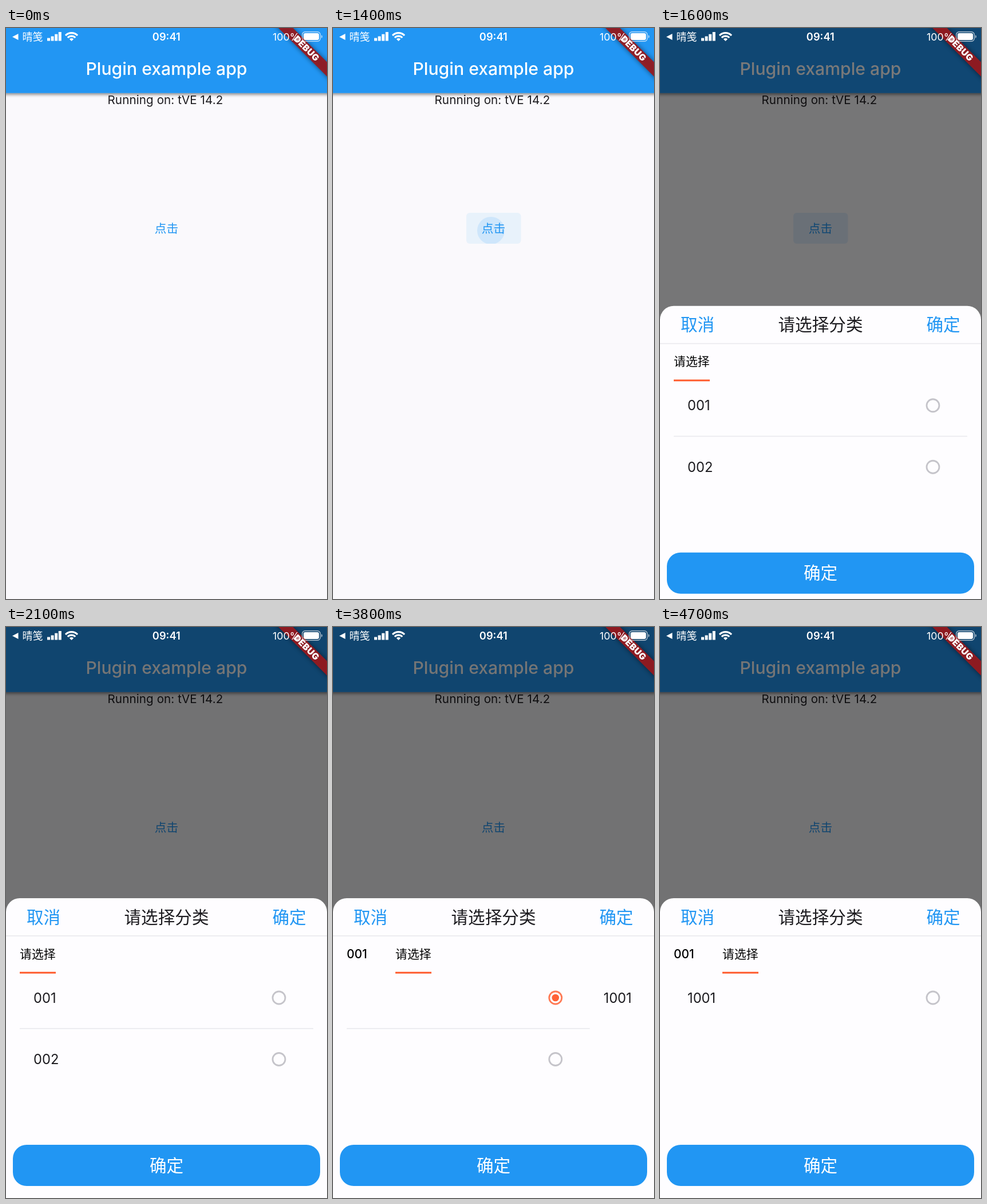
These frames come from a looping animation (561 by 998 pixels, 5000 ms). An HTML page:

```html
<!DOCTYPE html>
<html lang="zh-CN">
<head>
<meta charset="utf-8">
<style>
  html, body { margin: 0; width: 100%; height: 100%; overflow: hidden; background: #faf9fc; }
  svg { display: block; width: 561px; height: 998px; }
  text { font-family: Inter, "Noto Sans CJK SC", "Noto Sans CJK", sans-serif; fill: #1d1c20; }
  .mid { text-anchor: middle; }
  .blue { fill: #2196f3; }
  .white { fill: #fff; }
  .head { font-size: 29.6px; }
  .tab { font-size: 20.9px; fill: #000; }
  .row { font-size: 23.7px; }
  .line { fill: #e9e9ed; }
  .ring { fill: none; stroke: #c5c4ca; stroke-width: 2.8; }
</style>
</head>
<body>
<svg viewBox="0 0 561 998">
  <defs>
    <filter id="barShadow" x="-10%" y="-10%" width="120%" height="130%">
      <feDropShadow dx="0" dy="3" stdDeviation="2.6" flood-opacity=".42"/>
    </filter>
    <filter id="blur" x="-30%" y="-60%" width="160%" height="220%"><feGaussianBlur stdDeviation="4.5"/></filter>
    <clipPath id="buttonClip"><rect x="233" y="323" width="95.5" height="54" rx="6"/></clipPath>
    <clipPath id="pageClip"><rect x="24" y="607" width="513" height="290"/></clipPath>
  </defs>

  <rect width="561" height="998" fill="#faf9fc"/>
  <rect x="-20" y="-20" width="601" height="133.7" class="blue" filter="url(#barShadow)"/>
  <text class="mid white" x="280.5" y="82.2" font-size="30.2" font-weight="500">Plugin example app</text>
  <text x="177.5" y="133" font-size="20.6" letter-spacing=".1">Running on: tVE 14.2</text>
  <g clip-path="url(#buttonClip)" class="blue">
    <rect id="highlight" x="233" y="323" width="96" height="54"/>
    <circle id="ripple" cx="276" cy="354"/>
  </g>
  <text class="mid blue" x="280.5" y="358" font-size="20.7">点击</text>

  <rect id="dim" width="561" height="998"/>

  <g id="sheet">
    <path d="M0 1000V498a24 24 0 0 1 24-24H537a24 24 0 0 1 24 24V1000Z" fill="#fefdff"/>
    <text class="head blue" x="36" y="517.5">取消</text>
    <text class="head mid" x="280.5" y="517.5">请选择分类</text>
    <text class="head blue" x="465.5" y="517.5">确定</text>
    <rect class="line" y="539" width="561" height="1.6"/>
    <text id="picked" class="tab" x="24" y="578.5" font-weight="500">001</text>
    <g id="prompt">
      <text class="tab" x="24" y="578.7">请选择</text>
      <rect x="24" y="602.7" width="63" height="3" fill="#ff5a2b"/>
    </g>
    <g clip-path="url(#pageClip)">
      <g id="pages">
        <text class="row" x="48" y="656.5">001</text>
        <circle id="radio" class="ring" cx="477" cy="648" r="11"/>
        <circle id="dot" cx="477" cy="648" fill="#ff6236"/>
        <rect class="line" x="24" y="701" width="513" height="1.6"/>
        <text class="row" x="48" y="764">002</text>
        <circle class="ring" cx="477" cy="755.5" r="11"/>
        <text class="row" x="561" y="656.5">1001</text>
        <circle class="ring" cx="990" cy="648" r="11"/>
      </g>
    </g>
    <rect class="blue" x="12" y="905" width="537" height="72" rx="24"/>
    <text class="head mid white" x="280.5" y="951.5">确定</text>
  </g>

  <g transform="translate(561 0) rotate(45)">
    <rect x="-80" y="42" width="160" height="18" opacity=".5" filter="url(#blur)"/>
    <rect x="-80" y="42" width="160" height="18" fill="#981a1f" opacity=".92"/>
    <text class="mid white" y="56" font-size="15.6" font-weight="900" letter-spacing=".3">DEBUG</text>
  </g>

  <g class="white">
    <path d="M11 15.5L21.5 10V21Z"/>
    <text class="white" x="28.5" y="22" font-size="18">晴笺</text>
    <path d="M72 17.5h5v5h-5zM78.6 14.5h5v8h-5zM85.2 10.8h5v11.7h-5zM91.8 7h5v15.5h-5z"/>
    <g fill="none" stroke="#fff" stroke-width="3.2">
      <path d="M104 13.2a14.5 14.5 0 0 1 21 0M107.8 17a9.3 9.3 0 0 1 13.4 0"/>
    </g>
    <path d="M114.5 23L110.8 19.2a5.3 5.3 0 0 1 7.4 0Z"/>
    <text class="mid white" x="280.3" y="22" font-size="18.3" font-weight="600">09:41</text>
    <text class="white" x="466" y="22" font-size="17.8">100%</text>
    <rect x="517.7" y="6.7" width="31.6" height="16.6" rx="5" fill="none" stroke="#fff" stroke-width="1.4" opacity=".65"/>
    <rect x="520" y="9" width="27" height="12" rx="3"/>
    <path d="M551 12.3a3 3 0 0 1 0 5.6Z" opacity=".65"/>
  </g>
</svg>
<script>
const LOOP = 5000, STEP = 100;
const el = id => document.getElementById(id);
const set = (id, attrs) => {
  for (const name in attrs) el(id).setAttribute(name, attrs[name]);
};
const ramp = (t, start, length) => Math.min(1, Math.max(0, (t - start) / length));

function bezier(x1, y1, x2, y2) {
  const at = (a, b, s) => 3 * a * s * (1 - s) ** 2 + 3 * b * s * s * (1 - s) + s ** 3;
  return x => {
    let low = 0, high = 1;
    for (let i = 0; i < 24; i++) {
      const s = (low + high) / 2;
      if (at(x1, x2, s) < x) low = s; else high = s;
    }
    return at(y1, y2, high);
  };
}
const ease = bezier(.25, .1, .25, 1);
const decelerate = bezier(0, 0, .2, 1);

function draw(t) {
  // Button press
  const pressed = t >= 1300 && t < 1500;
  const glow = pressed ? .08 * ramp(t, 1250, 150) : t >= 1500 ? .14 * (1 - ramp(t, 1500, 600)) : 0;
  set('highlight', { opacity: glow });
  set('ripple', { r: pressed ? 18 + 6 * ramp(t, 1300, 100) : 0, opacity: .13 });

  // Bottom sheet
  const open = ramp(t, 1400, 250);
  set('dim', { opacity: .54 * ease(open) });
  set('sheet', { transform: `translate(0 ${524 * (1 - decelerate(open))})` });

  // Choosing a row, then sliding to the next level
  const chosen = ramp(t, 3600, 200);
  set('radio', { style: chosen ? 'stroke:#ff7a55' : '' });
  set('dot', { r: 6.3 * chosen });
  const next = t > 3757;
  set('picked', { visibility: next ? 'visible' : 'hidden' });
  set('prompt', { transform: `translate(${next ? 85 : 0} 0)` });
  set('pages', { transform: `translate(${-513 * ease(ramp(t, 3757, 300))} 0)` });
}

function tick() {
  draw(Math.floor(performance.now() % LOOP / STEP) * STEP);
  requestAnimationFrame(tick);
}
tick();
</script>
</body>
</html>
```
